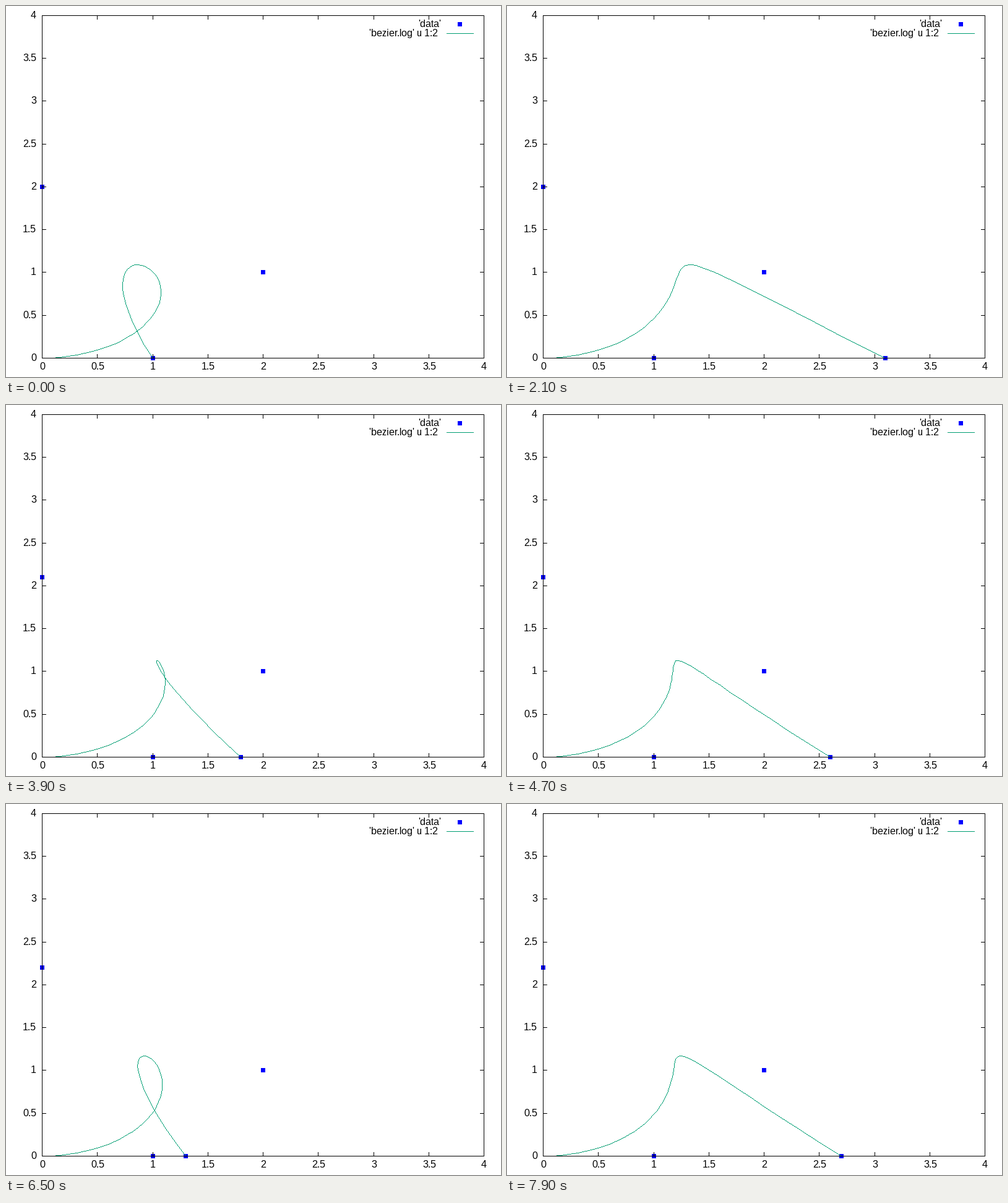
Animation, 800 px wide and 600 px high, one loop 8 s. Source, as a matplotlib script:

```python
import numpy as np
import matplotlib.pyplot as plt
from matplotlib.animation import FuncAnimation
from matplotlib.collections import PolyCollection
from matplotlib.patches import Rectangle

plt.rcParams.update({
    "font.family": "Liberation Sans",
    "text.hinting": "native",
    "text.hinting_factor": 1,
})

W, H, DPI = 800, 600, 100
LEFT, RIGHT, TOP, BOTTOM = 58, 772, 15, 569
FRAMES, INTERVAL = 80, 100
SWEEP = 31          # steps of the end point from x = 1 to x = 4
TICK = 6
BLUE, GREEN = "#0000ff", "#009e73"

fig = plt.figure(figsize=(W / DPI, H / DPI), dpi=DPI, facecolor="white")
ax = fig.add_axes([0, 0, 1, 1])
ax.set(xlim=(0, W), ylim=(H, 0))
ax.axis("off")


def to_pixel(x, y):
    """Data coordinates to the column and row of a pixel."""
    col = np.floor(LEFT + np.asarray(x) * (RIGHT - LEFT) / 4 + 0.5 + 1e-9)
    up = np.floor(np.asarray(y) * (BOTTOM - TOP) / 4 + 0.5 + 1e-9)
    return col.astype(int), (BOTTOM - up).astype(int)


def box(x0, y0, x1, y1, color, z):
    """Fill the pixels from (x0, y0) to (x1, y1), both included."""
    return ax.add_patch(Rectangle((x0, y0), x1 - x0 + 1, y1 - y0 + 1, fc=color,
                                  lw=0, antialiased=False, zorder=z))


def marker(col, row):
    return box(col - 3, row - 3, col + 3, row + 3, BLUE, 1)


def label(x, row, text):
    ax.text(x, row + 5, text, fontsize=16 * 72 / DPI, color="black",
            ha="left", va="baseline", zorder=4)


def draw_axes():
    for x in (LEFT, RIGHT):
        box(x, TOP, x, BOTTOM, "black", 3)
    for y in (TOP, BOTTOM):
        box(LEFT, y, RIGHT, y, "black", 3)
    for v in np.arange(0, 4.5, 0.5):
        col, row = to_pixel(v, v)
        whole = v == int(v)
        box(col, TOP, col, TOP + TICK, "black", 3)
        box(col, BOTTOM - TICK, col, BOTTOM, "black", 3)
        box(LEFT, row, LEFT + TICK, row, "black", 3)
        box(RIGHT - TICK, row, RIGHT, row, "black", 3)
        label(col - (4 if whole else 10), 583, f"{v:g}")
        label(40 if whole else 27, row, f"{v:g}")


def draw_key():
    label(666, 29, "'data'")
    marker(733, 29)
    label(587, 44, "'bezier.log' u 1:2")
    box(712, 44, 755, 44, GREEN, 2)


def bezier(points, steps=50):
    """De Casteljau evaluation at evenly spaced parameters."""
    t = np.linspace(0, 1, steps + 1)[:, None]
    level = [np.asarray(p, float) for p in points]
    while len(level) > 1:
        level = [(1 - t) * a + t * b for a, b in zip(level, level[1:])]
    return level[0]


def raster(cols, rows):
    """Pixels of a one pixel wide polyline without smoothing."""
    cells = []
    pts = np.column_stack([cols, rows])
    for a, b in zip(pts, pts[1:]):
        n = max(abs(b - a).max(), 1)
        s = np.arange(n + 1)[:, None] / n
        cells.append(np.floor(a + s * (b - a) + 0.5))
    return np.unique(np.vstack(cells), axis=0)


UNIT = np.array([[0, 0], [1, 0], [1, 1], [0, 1]])

draw_axes()
draw_key()
for p in ((1, 0), (2, 1)):
    marker(*to_pixel(*p))
handle = marker(*to_pixel(0, 2))
end = marker(*to_pixel(1, 0))
curve = PolyCollection([], facecolors=GREEN, edgecolors="none", linewidths=0,
                       antialiaseds=False, snap=False, zorder=2)
ax.add_collection(curve, autolim=False)


def update(i):
    lap, step = divmod(i, SWEEP)
    top = (0, 2 + lap / 10)
    tip = (1 + step / 10, 0)
    for patch, p in ((handle, top), (end, tip)):
        col, row = to_pixel(*p)
        patch.set_xy((col - 3, row - 3))
    path = bezier([(0, 0), (1, 0), (2, 1), top, tip])
    cells = raster(*to_pixel(path[:, 0], path[:, 1]))
    curve.set_verts(cells[:, None, :] + UNIT)
    return handle, end, curve


anim = FuncAnimation(fig, update, frames=FRAMES, interval=INTERVAL,
                     repeat=True, repeat_delay=0, blit=False)
plt.show()
```
